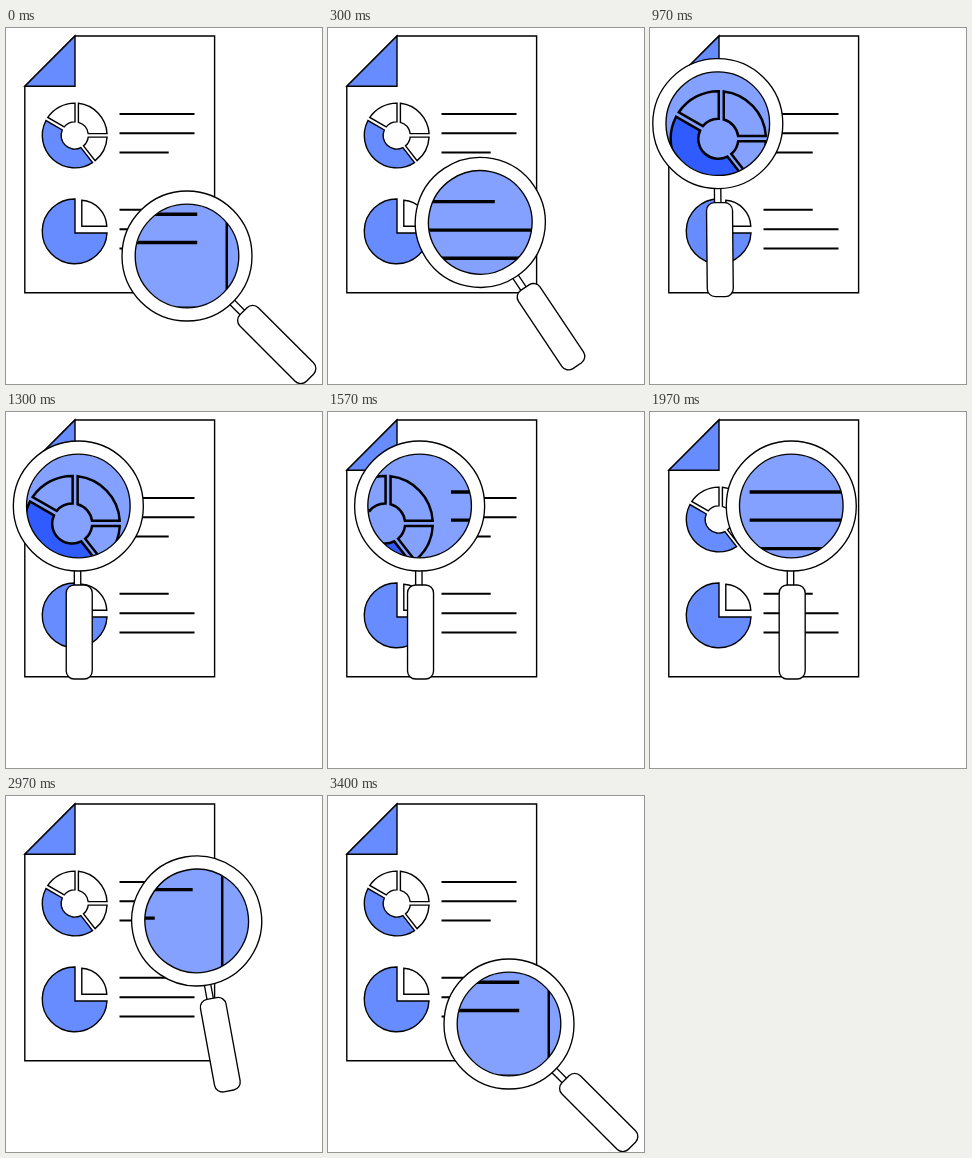
Animation, 316 px wide and 356 px high, one loop 3.66 s. Source, as an HTML page:

```html
<!DOCTYPE html>
<html lang="en">
<head>
<meta charset="utf-8">
<title>Report search</title>
<style>
  html, body { margin: 0; width: 100%; height: 100%; overflow: hidden; background: #fff; }
  svg { display: block; width: 316px; height: 356px; }
  #report { stroke: #000; stroke-width: var(--line); }
  .paper { fill: var(--paper); }
  .blue { fill: var(--blue); }
  .text { fill: none; stroke-width: var(--text); }
  .plain { --paper: #fff; --blue: #668cff; --line: 1.4; --text: 2; }
  .zoomed { --paper: #84a1ff; --blue: #305cff; --line: 1.7; --text: 2.3; }
  .glass { fill: #fff; stroke: #000; stroke-width: 1.35; }
</style>
</head>
<body>
<svg viewBox="0 0 316 356">
  <defs>
    <g id="report">
      <path class="paper" d="M69 8H208.6V264.7H18.8V58.2Z"/>
      <path class="blue" d="M18.8 58.2L69 8V58.2Z"/>
      <g id="donut"></g>
      <path class="blue" d="M69 171V205H101A32.4 32.4 0 1 1 69 171Z"/>
      <path class="paper" d="M75.8 172.2V198.2H100.8A27 27 0 0 0 75.8 172.2Z"/>
      <path class="text" d="M113.5 86H188.5M113.5 105.2H188.5M113.5 124.6H162.7M113.5 181.8H162.7M113.5 201.2H188.5M113.5 220.4H188.5"/>
    </g>
    <clipPath id="lens"><circle id="hole" r="51.8"/></clipPath>
  </defs>
  <use href="#report" class="plain"/>
  <g clip-path="url(#lens)">
    <rect width="316" height="356" fill="#84a1ff"/>
    <use href="#report" id="zoom" class="zoomed"/>
  </g>
  <g id="glass" class="glass">
    <rect x="-4" y="62" width="6.4" height="22"/>
    <path fill-rule="evenodd" d="M-65 0A65 65 0 1 1 65 0A65 65 0 1 1 -65 0ZM-51.8 0A51.8 51.8 0 1 1 51.8 0A51.8 51.8 0 1 1 -51.8 0Z"/>
    <rect x="-12.1" y="79" width="26" height="94" rx="8"/>
  </g>
</svg>
<script>
const $ = id => document.getElementById(id);
const LOOP = 3660, ZOOM = 1.47;

// Donut pieces: each edge is a direction in degrees and a sideways shift
function piece(kind, a1, o1, a2, o2) {
  const at = (r, a, o) => {
    const t = a * Math.PI / 180 + Math.asin(o / r);
    return (68.7 + r * Math.cos(t)).toFixed(2) + ' ' + (107.5 + r * Math.sin(t)).toFixed(2);
  };
  const R = 32.4, r = 13.6;
  return `<path class="${kind}" d="M${at(R, a1, o1)}A${R} ${R} 0 0 1 ${at(R, a2, o2)}` +
    `L${at(r, a2, o2)}A${r} ${r} 0 0 0 ${at(r, a1, o1)}Z"/>`;
}
$('donut').innerHTML =
  piece('paper', -90, 3.7, 0, -1.9) +
  piece('paper', 0, 1.6, 52, -0.6) +
  piece('blue', 52, 2.6, 210, -1.4) +
  piece('paper', 210, 2.2, 270, 0.3);

// Cubic Bezier easing with handles (a, 0) and (b, 1)
function ease(u, a, b) {
  let lo = 0, hi = 1;
  for (let i = 0; i < 24; i++) {
    const s = (lo + hi) / 2, q = 1 - s;
    if (3 * q * q * s * a + 3 * q * s * s * b + s * s * s < u) lo = s; else hi = s;
  }
  return lo * lo * (3 - 2 * lo);
}

// Poses are [x, y, handle angle]
const REST = [181, 228, 45], LEFT = [66.4, 94, 0], RIGHT = [193.6, 94, 0];
const MOVES = [
  { from: REST, to: LEFT, start: 0, end: 1035, a: 0.25, b: 0.667 },
  { from: LEFT, to: RIGHT, start: 1035, end: 2670, a: 0.45, b: 0.6 },
  { from: RIGHT, to: REST, start: 2670, end: 3400, a: 0.6, b: 0.55 }
];

function pose(t) {
  const m = MOVES.find(m => t < m.end);
  if (!m) return REST;
  const k = ease((t - m.start) / (m.end - m.start), m.a, m.b);
  return m.from.map((v, i) => v + (m.to[i] - v) * k);
}

function draw(ms) {
  // Motion runs at 30 steps per second
  const t = Math.floor((ms % LOOP + 4) * 0.03) / 0.03;
  const [x, y, angle] = pose(t);
  $('hole').setAttribute('cx', x);
  $('hole').setAttribute('cy', y);
  $('zoom').setAttribute('transform',
    `translate(${x - 0.8} ${y - 2.3}) scale(${ZOOM}) translate(${-x} ${-y})`);
  $('glass').setAttribute('transform', `translate(${x} ${y}) rotate(${-angle})`);
}

let begin;
function tick(now) {
  begin ??= now;
  draw(now - begin);
  requestAnimationFrame(tick);
}
draw(0);
requestAnimationFrame(tick);
</script>
</body>
</html>
```
